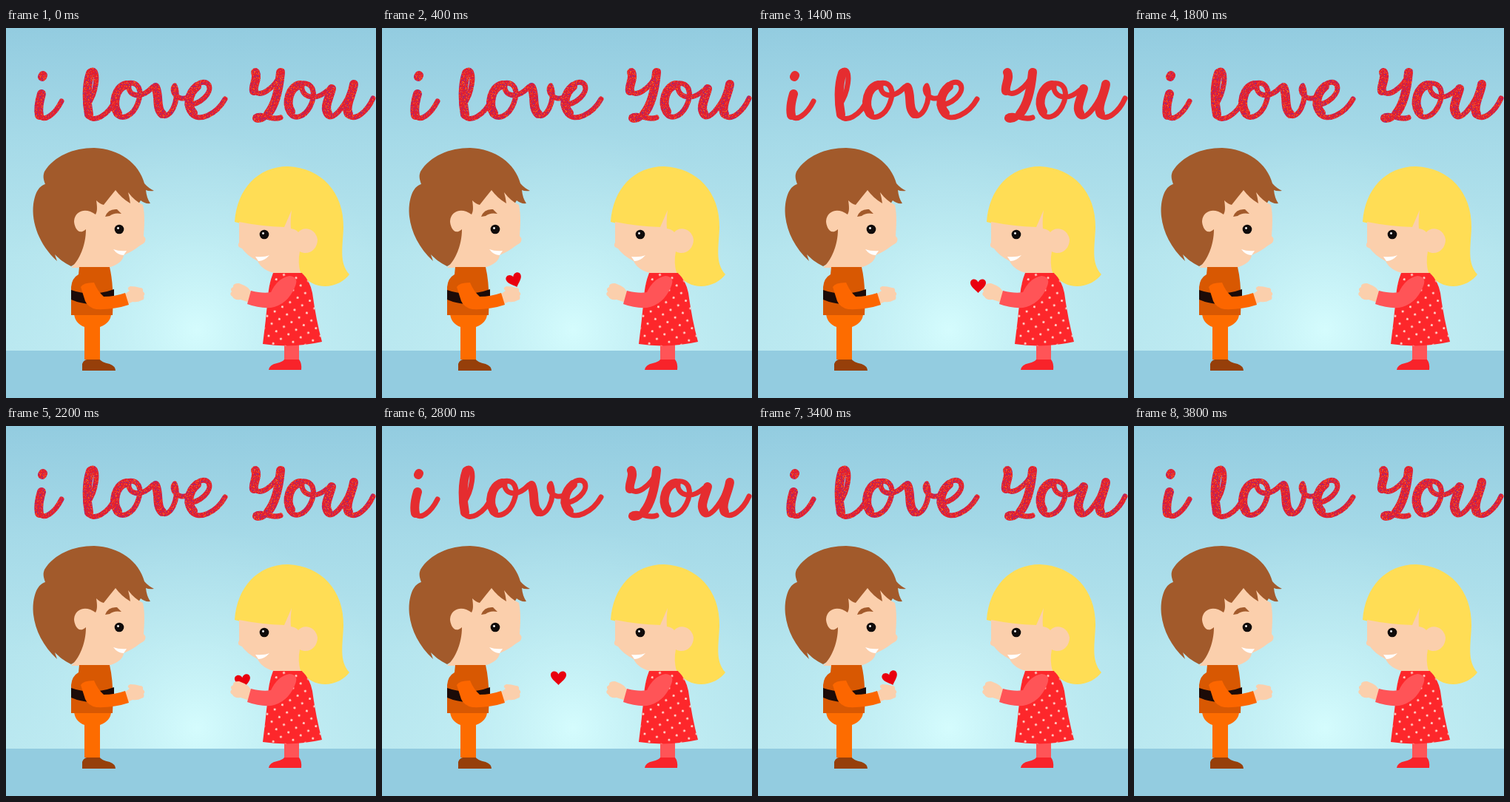
An HTML page for the animation above (4 s loop, 500 by 500 pixels).

```html
<!DOCTYPE html>
<html lang="en">
<head>
<meta charset="utf-8">
<title>i love You</title>
<style>
  html, body { margin: 0; width: 100%; height: 100%; overflow: hidden; background: #94cde1; }
  svg { display: block; width: 100%; height: 100%; }
</style>
</head>
<body>
<svg viewBox="0 0 500 500" role="img" aria-label="i love You">
  <defs>
    <linearGradient id="sky" x2="0" y2="1">
      <stop offset="0" stop-color="#93cce0"/>
      <stop offset=".35" stop-color="#a6dae8"/>
      <stop offset=".7" stop-color="#b5e5ee"/>
      <stop offset="1" stop-color="#bae8f0"/>
    </linearGradient>
    <radialGradient id="glow" gradientUnits="userSpaceOnUse" cx="258" cy="408" r="270">
      <stop offset="0" stop-color="#d6fdfe" stop-opacity=".95"/>
      <stop offset=".5" stop-color="#c8f3f7" stop-opacity=".45"/>
      <stop offset="1" stop-color="#c0ecf2" stop-opacity="0"/>
    </radialGradient>
    <pattern id="glitter" width="64" height="64" patternUnits="userSpaceOnUse">
      <rect width="64" height="64" fill="#e3222c"/>
    </pattern>
    <pattern id="dots" width="17" height="17" patternUnits="userSpaceOnUse" patternTransform="translate(352 341) rotate(14)">
      <g fill="#ffe1d6"><circle cx="4" cy="4" r="1.5"/><circle cx="12.5" cy="12.5" r="1.5"/></g>
    </pattern>
    <path id="dress" d="M361 331H400Q411 342 414 358Q419 395 427 424Q387 433 347 427Q351 396 354 364Q355 346 361 331Z"/>
  </defs>

  <rect width="500" height="437" fill="url(#sky)"/>
  <rect width="500" height="437" fill="url(#glow)"/>
  <rect y="436" width="500" height="64" fill="#93cce0"/>

  <g id="words" fill="none" stroke-linecap="round" stroke-linejoin="round">
    <g stroke-width="7">
      <path d="M45 118C51 128 66 117 75 99"/>
      <path d="M110 104C122 89 126 57 117 57C110 57 109 72 109 88M110 116C116 131 139 119 149 94"/>
      <path d="M163 75C179 71 185 84 178 102C172 118 157 126 149 116M166 77C164 91 181 98 198 80"/>
      <path d="M210 117C221 126 236 97 228 78C222 85 231 99 245 94"/>
      <path d="M245 104C262 104 279 88 274 77C270 71 260 72 254 82M250 115C260 129 285 116 296 96"/>
      <path d="M335 82C340 98 364 82 373 58M354 116C347 127 334 126 337 120C345 114 359 126 371 121"/>
      <path d="M398 75C415 72 420 88 411 106C403 121 389 125 383 114M400 77C398 92 416 101 435 84"/>
      <path d="M433 117C441 128 457 106 465 88M461 117C471 128 488 113 496 95"/>
    </g>
    <g stroke-width="12">
      <path d="M48 89C45 99 43 109 45 118M49 66L50 64"/>
      <path d="M114 61C108 78 109 102 112 117"/>
      <path d="M162 77C148 80 143 103 151 115"/>
      <path d="M202 80C208 92 202 108 211 116"/>
      <path d="M258 79C246 89 244 105 253 115"/>
      <path d="M337 60C341 68 333 78 335 85M371 60C369 82 364 104 354 116"/>
      <path d="M397 77C384 79 377 100 385 113"/>
      <path d="M440 82C437 95 429 107 435 115M470 76C468 91 457 106 463 116"/>
    </g>
  </g>

  <!-- boy -->
  <path fill="#a25a2b" d="M88 322C78 317 72 312 66 306L69 315C45 293 34 263 37 238C40 220 45 214 53 211C50 203 50 199 52 194C65 173 91 162 119 162C153 163 180 183 187 210Q192 216 200 220Q193 221 189 219Q190 230 195 237Q188 238 182 233L150 285Z"/>
  <path fill="#fbcfac" d="M108 272C97 282 92 267 92 261C93 247 108 242 121 252C124 247 123 240 122 233Q127 238 132 239Q139 230 148 219Q156 230 168 237Q167 229 165 222Q174 234 185 239C188 253 187 267 186 281Q191 286 186 291L181 294Q171 302 159 307Q158 318 138 324H88C99 314 108 294 108 272Z"/>
  <path fill="#a25a2b" d="M134 255Q138 244 150 245L156 251Q146 249 140 254Z"/>
  <g class="eye" transform="translate(153 272)"></g>
  <path fill="#fff" d="M145 299Q153 302 163 301L159 307Q151 307 145 299Z"/>
  <path fill="#963f0a" d="M103 463V454Q105 447 115 447H126Q129 452 140 454Q148 457 148 463Z"/>
  <path fill="#fd6c00" d="M92 386H142Q142 398 127 404V448H106V404Q93 399 92 386Z"/>
  <path fill="#d85802" d="M99 323H140Q146 348 144 388H88V350Q89 338 98 333Z"/>
  <path fill="#1c0b08" d="M88 354Q116 364 146 353V364Q118 380 88 367Z"/>

  <!-- girl -->
  <path fill="#ffdd55" d="M309 262C312 218 340 187 381 187C426 189 457 222 456 270C455 297 450 317 464 333C452 350 418 359 398 331L380 280Z"/>
  <path fill="#fbcfac" d="M315 262Q345 268 376 269L386 246Q384 260 385 271Q392 272 395 276C402 267 419 271 421 286C421 300 408 308 397 302Q394 316 398 332H366Q346 328 340 315Q325 307 319 298Q311 295 315 290Z"/>
  <g class="eye" transform="translate(349 279)"></g>
  <path fill="#fff" d="M356 307Q349 310 337 309L341 315Q349 315 356 307Z"/>
  <path fill="#ff5457" d="M376 426H396V450H376Z"/>
  <path fill="#f8232a" d="M355 462Q356 455 366 453Q374 451 376 448H396Q400 453 399 462Z"/>
  <use href="#dress" fill="#fd272b"/>
  <use href="#dress" fill="url(#dots)"/>

  <path id="heart" fill="#e9000e" d="M0 9.5C-4 5-10.5 1-10.5-4C-10.5-10-2.5-11 0-5C2.5-11 10.5-10 10.5-4C10.5 1 4 5 0 9.5Z"/>

  <!-- arms and hands -->
  <path fill="#fbcfac" d="M160 360L167 355Q162 351 168 349Q175 349 181 351Q186 351 185 356Q189 359 186 362Q188 367 183 368Q178 371 171 370L162 374Z"/>
  <path fill="#fc6600" d="M101 350Q104 344 119 344Q124 356 132 363Q147 363 161 358L166 374Q145 381 122 380Q111 378 107 369Z"/>
  <path fill="#fbcfac" d="M331 356L327 351Q321 347 315 345Q306 345 307 350Q302 352 305 356Q301 360 306 363Q308 368 317 367L329 371Z"/>
  <path fill="#ff5457" d="M331 355Q347 359 358 357Q367 338 383 335Q397 336 390 351Q380 374 358 378Q342 379 326 373Z"/>
</svg>
<script>
  const NS = "http://www.w3.org/2000/svg";
  const $ = id => document.getElementById(id);
  const words = $("words"), heart = $("heart"), glitter = $("glitter");
  const STEP = 200, COUNT = 10;

  function add(parent, tag, attrs) {
    const el = document.createElementNS(NS, tag);
    for (const key in attrs) el.setAttribute(key, attrs[key]);
    return parent.appendChild(el);
  }

  function seeded(seed) {
    return () => (seed = (seed * 16807) % 2147483647) / 2147483647;
  }

  // fine coloured grains for the lettering
  const rand = seeded(71);
  for (const fill of ["#b81c66", "#f9601f", "#d21a4a", "#8a2c8c", "#f4402c"]) {
    let d = "";
    for (let i = 0; i < 420; i++) {
      d += `M${Math.floor(rand() * 64)} ${Math.floor(rand() * 64)}h1v1h-1z`;
    }
    add(glitter, "path", { d, fill });
  }

  for (const eye of document.querySelectorAll(".eye")) {
    add(eye, "circle", { r: 6.3, fill: "#100c0b" });
    add(eye, "circle", { cx: -1.5, cy: -1.5, r: 1.4, fill: "#fff" });
  }

  // heart pose per step: x, y, tilt
  const poses = [
    null, [173, 346, -20], [179, 341, -20], [195, 335, -20], [213, 334.5, -20],
    [238.5, 340.5, 0], [268, 340, 0], [297.5, 348.5, 0], [320, 345, -8], null
  ];

  function draw(time) {
    const tick = Math.floor(time / STEP) % (2 * COUNT);
    const step = tick < COUNT ? tick : 2 * COUNT - 1 - tick;
    const pose = poses[step];
    heart.setAttribute("visibility", pose ? "visible" : "hidden");
    if (pose) heart.setAttribute("transform", `translate(${pose[0]} ${pose[1]}) rotate(${pose[2]})`);

    const plain = step >= 5 && step <= 7;
    words.setAttribute("stroke", plain ? "#e52d30" : "url(#glitter)");
    glitter.setAttribute("patternTransform", `translate(${step % 2 * 23} ${step % 2 * 37})`);
  }

  const start = performance.now();
  function loop() {
    draw(performance.now() - start);
    requestAnimationFrame(loop);
  }
  loop();
</script>
</body>
</html>
```
